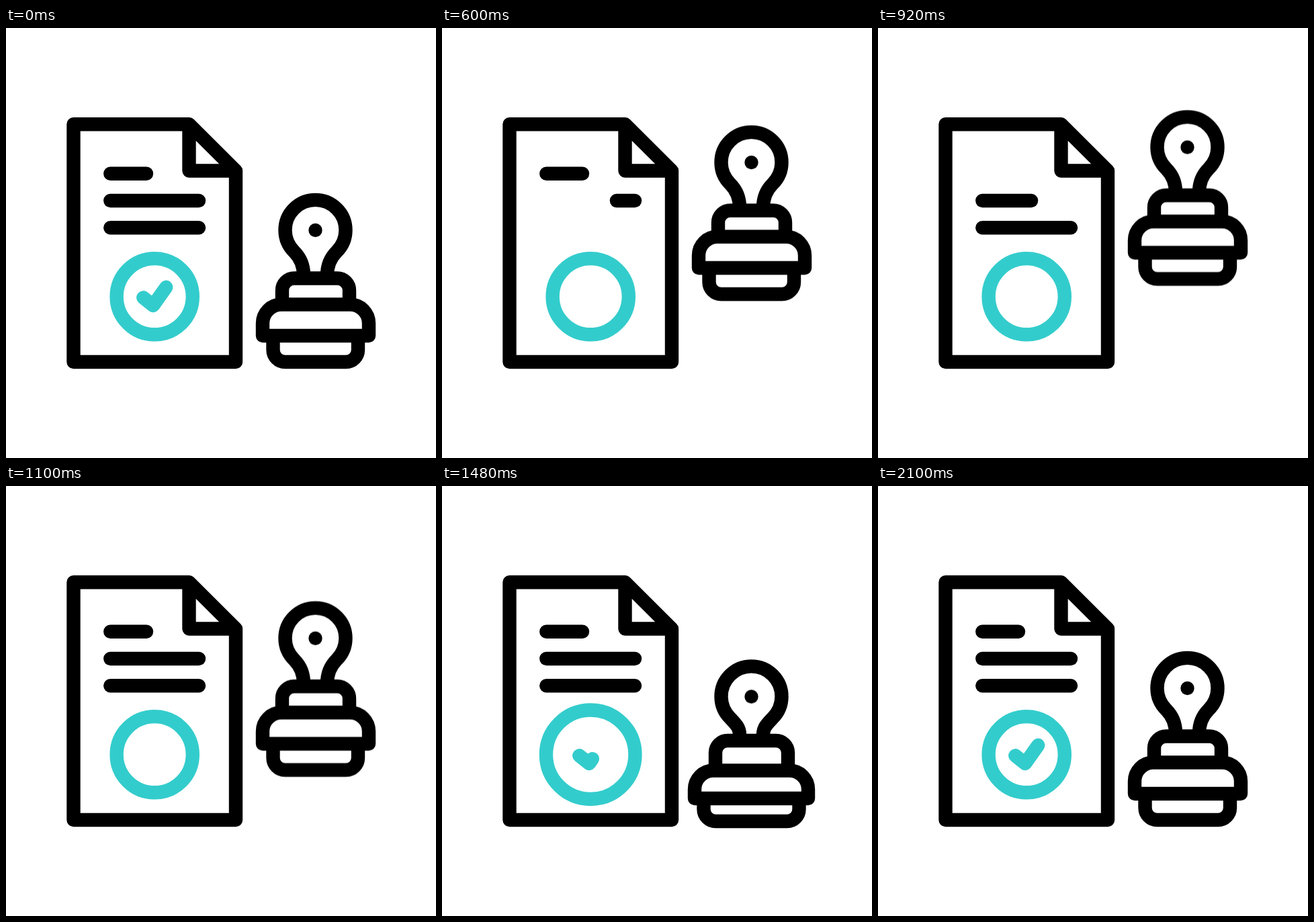
Animation of 640x640 px, one loop 2.5 s. Source, as an HTML page without scripts:

```html
<!DOCTYPE html>
<html lang="en">
<head>
<meta charset="utf-8">
<title>Document and stamp</title>
<style>
html, body { margin: 0; width: 100%; height: 100%; overflow: hidden; background: #fff; }
svg { display: block; width: 100%; height: 100%; fill: none; stroke: #000; stroke-width: 20.4; stroke-linejoin: round; }
svg * { animation: 2.5s linear infinite; }

.line, .tick { stroke-linecap: round; stroke-dasharray: 1 2; }
.seal, .tick { stroke: #3cc; }

/* lines: wiped from the left, bottom one first, then written again */
.l3 { animation-name: l3; }
.l2 { animation-name: l2; }
.l1 { animation-name: l1; }
@keyframes l3 {
  0%, 8% { stroke-dashoffset: 0; }
  16.96%, 29.59% { stroke-dashoffset: -1.01; }
  29.6% { stroke-dashoffset: 1.01; }
  34.25%, 100% { stroke-dashoffset: 0; }
}
@keyframes l2 {
  0%, 16.96% { stroke-dashoffset: 0; }
  25.96%, 34.24% { stroke-dashoffset: -1.01; }
  34.25% { stroke-dashoffset: 1.01; }
  38.9%, 100% { stroke-dashoffset: 0; }
}
@keyframes l1 {
  0%, 25.96% { stroke-dashoffset: 0; }
  29.6%, 38.89% { stroke-dashoffset: -1.01; }
  38.9% { stroke-dashoffset: 1.01; }
  40.8%, 100% { stroke-dashoffset: 0; }
}

.tick { animation-name: tick; }
@keyframes tick {
  0%, 8% { stroke-dashoffset: 0; }
  23.8%, 50.79% { stroke-dashoffset: -1.01; }
  50.8% { stroke-dashoffset: 1.01; }
  66.8%, 100% { stroke-dashoffset: 0; }
}

.seal { r: 56.6px; animation-name: seal; }
@keyframes seal {
  0%, 50.4% { r: 56.6px; animation-timing-function: cubic-bezier(.33, .67, .67, 1); }
  65.6% { r: 68.3px; animation-timing-function: cubic-bezier(.33, 0, .67, 1); }
  84%, 100% { r: 56.6px; }
}

.stamp { animation-name: lift; }
@keyframes lift {
  0%, 8% { transform: translateY(0); animation-timing-function: cubic-bezier(.525, 0, .55, 1); }
  32% { transform: translateY(-133px); animation-timing-function: cubic-bezier(.333, 0, .667, .333); }
  50.4% { transform: translateY(4px); animation-timing-function: ease-in-out; }
  59.2%, 100% { transform: translateY(0); }
}

/* each part bends from --rest to --flat and back */
.part { d: var(--rest); animation-name: squash; }
@keyframes squash {
  0%, 47.2% { d: var(--rest); animation-timing-function: cubic-bezier(.15, .9, .4, 1.6); }
  59.2% { d: var(--flat); animation-timing-function: ease-in-out; }
  68.8%, 100% { d: var(--rest); }
}
.head {
  --rest: path("M443 368C443 352 437 341 429 333A45 45 0 1 1 492 333C484 341 478 352 478 368");
  --flat: path("M443 376C444 361 440 357 429 345.5A45 45 0 1 1 492 345.5C481 357 477 361 478 376");
}
.collar {
  --rest: path("M411 411V390.5A18 18 0 0 1 429 372.5H493A18 18 0 0 1 511 390.5V411");
  --flat: path("M407 423V397A18 18 0 0 1 425 379H497A18 18 0 0 1 515 397V423");
}
.body {
  --rest: path("M382 458V439.5A28 28 0 0 1 410 411.5H512A28 28 0 0 1 540 439.5V458Z");
  --flat: path("M376 465V451.5A28 28 0 0 1 404 423.5H517A28 28 0 0 1 545 451.5V465Z");
}
.base {
  --rest: path("M397.5 458V479A18 18 0 0 0 415.5 497H506A18 18 0 0 0 524 479V458");
  --flat: path("M389.5 465V481A18 18 0 0 0 407.5 499H513.5A18 18 0 0 0 531.5 481V465");
}
.dot { fill: #000; stroke: none; animation-name: dot; }
@keyframes dot {
  0%, 47.2% { transform: translateY(0); animation-timing-function: cubic-bezier(.15, .9, .4, 1.6); }
  59.2% { transform: translateY(12.5px); animation-timing-function: ease-in-out; }
  68.8%, 100% { transform: translateY(0); }
}
</style>
</head>
<body>
<svg viewBox="0 0 640 640">
  <path d="M100.5 143.2H272.5L342 212.5V497H100.5ZM272.5 143.2V212.5H342"/>
  <path class="line l1" pathLength="1" d="M155.3 216.8H209"/>
  <path class="line l2" pathLength="1" d="M155.3 257H287"/>
  <path class="line l3" pathLength="1" d="M155.3 297.2H287"/>
  <circle class="seal" cx="221.2" cy="399.7" r="56.6"/>
  <path class="tick" pathLength="1" d="M204.3 401.3L219 413L238.3 385.8"/>
  <g class="stamp">
    <path class="part head"/>
    <path class="part collar"/>
    <path class="part body"/>
    <path class="part base"/>
    <circle class="dot" cx="460.5" cy="301" r="10.2"/>
  </g>
</svg>
</body>
</html>
```
